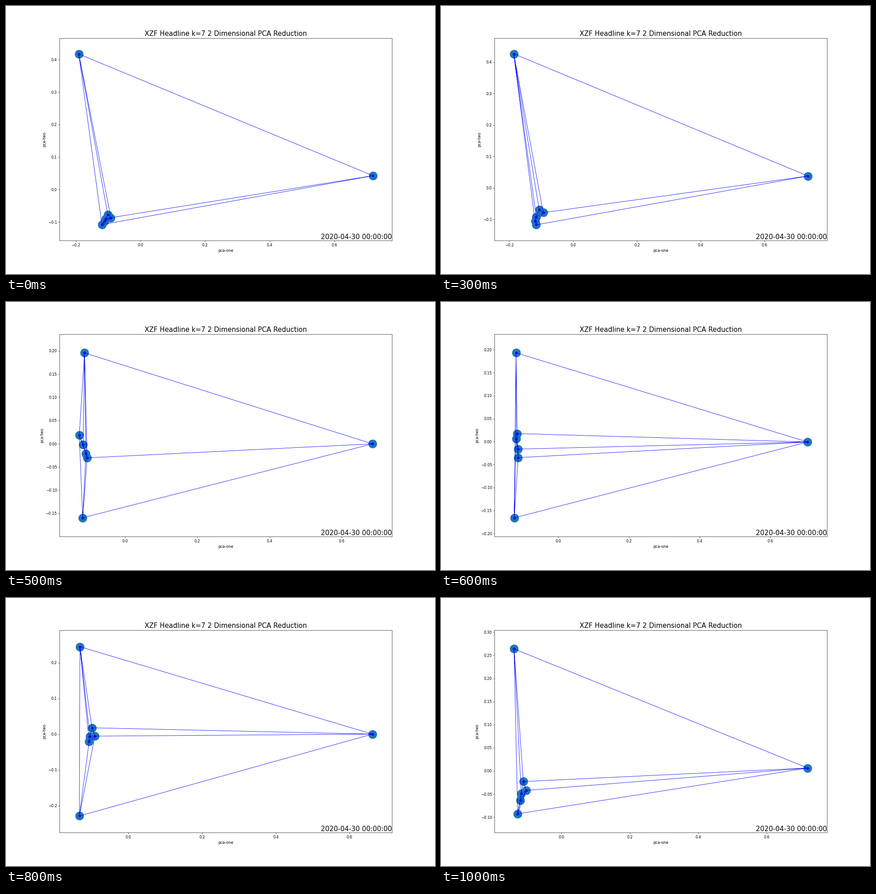
Recreate the animation shown at these times as a matplotlib script. Size 947 by 592 pixels, loop 1.1 s.

```python
import numpy as np
import matplotlib.pyplot as plt
from matplotlib.animation import FuncAnimation

W, H, DPI = 947, 592, 59.2
BOX = dict(left=0.125, right=0.9, bottom=0.125, top=0.88)
DOT_AREA = 500

# Shape shared by the four inner clusters, scaled and tilted at each step.
U = np.array([0.15, 1, -0.45, -0.7])
V = np.array([1, 0.1, -0.2, -0.9])


def project(p):
    """Seven cluster centres. PCA scores have zero mean and zero correlation,
    which fixes the far right centre and the height of the inner group."""
    top_x, top_y, low_x, low_y, mid_x, width, height, tilt = p
    dx, dy = width * U, height * V + tilt * U
    far_x = -(top_x + low_x + 4 * mid_x)
    mid_y = (far_x * (top_y + low_y) - top_x * top_y - low_x * low_y
             - dx @ dy) / (4 * (mid_x - far_x))
    far_y = -(top_y + low_y + 4 * mid_y)
    return (np.array([top_x, far_x, *(mid_x + dx), low_x]),
            np.array([top_y, far_y, *(mid_y + dy), low_y]))


def limits(values, pixels):
    """Range padded by the dot radius and a 5 % margin."""
    pad = np.sqrt(DOT_AREA) / 2 * DPI / 72 / pixels
    lo, hi = values.min() - pad, values.max() + pad
    margin = 0.05 * (hi - lo)
    return lo - margin, hi + margin


# Top x, y; low x, y; inner group x, width, height, tilt.
a, b, c, d, e, f, g = np.array([
    (-0.1907, 0.4169, -0.1192, -0.1082, -0.1025, 0.0111, 0.0098, 0),
    (-0.1193, 0.2156, -0.1343, -0.1116, -0.1153, 0.0127, 0.0198, 0.0014),
    (-0.1860, 0.4263, -0.1157, -0.1177, -0.1086, 0.0151, 0.0163, 0.0060),
    (-0.1121, 0.1955, -0.1172, -0.1594, -0.1140, -0.0127, 0.0029, 0.0270),
    (-0.1265, 0.1912, -0.1318, -0.1724, -0.1169, 0.0059, 0.0423, -0.0046),
    (-0.1354, 0.2976, -0.1331, -0.2852, -0.0823, 0.0126, 0.0021, -0.0034),
    (-0.1387, 0.2638, -0.1281, -0.0927, -0.1131, 0.0099, 0.0213, 0),
])

# One step per 100 ms; the first is held twice as long.
STEPS = [a, a, b, c, (c + d) / 2, d, (d + e) / 2, e, (e + f) / 2, f, g]

fig, ax = plt.subplots(figsize=((W + 0.01) / DPI, (H + 0.01) / DPI), dpi=DPI,
                       facecolor="white")
fig.subplots_adjust(**BOX)


def draw(i):
    x, y = project(STEPS[i])
    ax.clear()
    ax.scatter(x, y, s=DOT_AREA, color="#1f77b4")
    ax.triplot(x, y, "bo-", lw=1, markersize=6)
    ax.set_xlim(limits(x, ax.bbox.width))
    ax.set_ylim(limits(y, ax.bbox.height))
    ax.set_xlabel("pca-one")
    ax.set_ylabel("pca-two")
    ax.set_title("XZF Headline k=7 2 Dimensional PCA Reduction", fontsize=18)
    ax.text(1, 0, "2020-04-30 00:00:00", fontsize=18, ha="right", va="bottom",
            transform=ax.transAxes)
    return []


anim = FuncAnimation(fig, draw, frames=len(STEPS), init_func=lambda: draw(0),
                     interval=100, repeat=True, repeat_delay=0)
plt.show()
```
